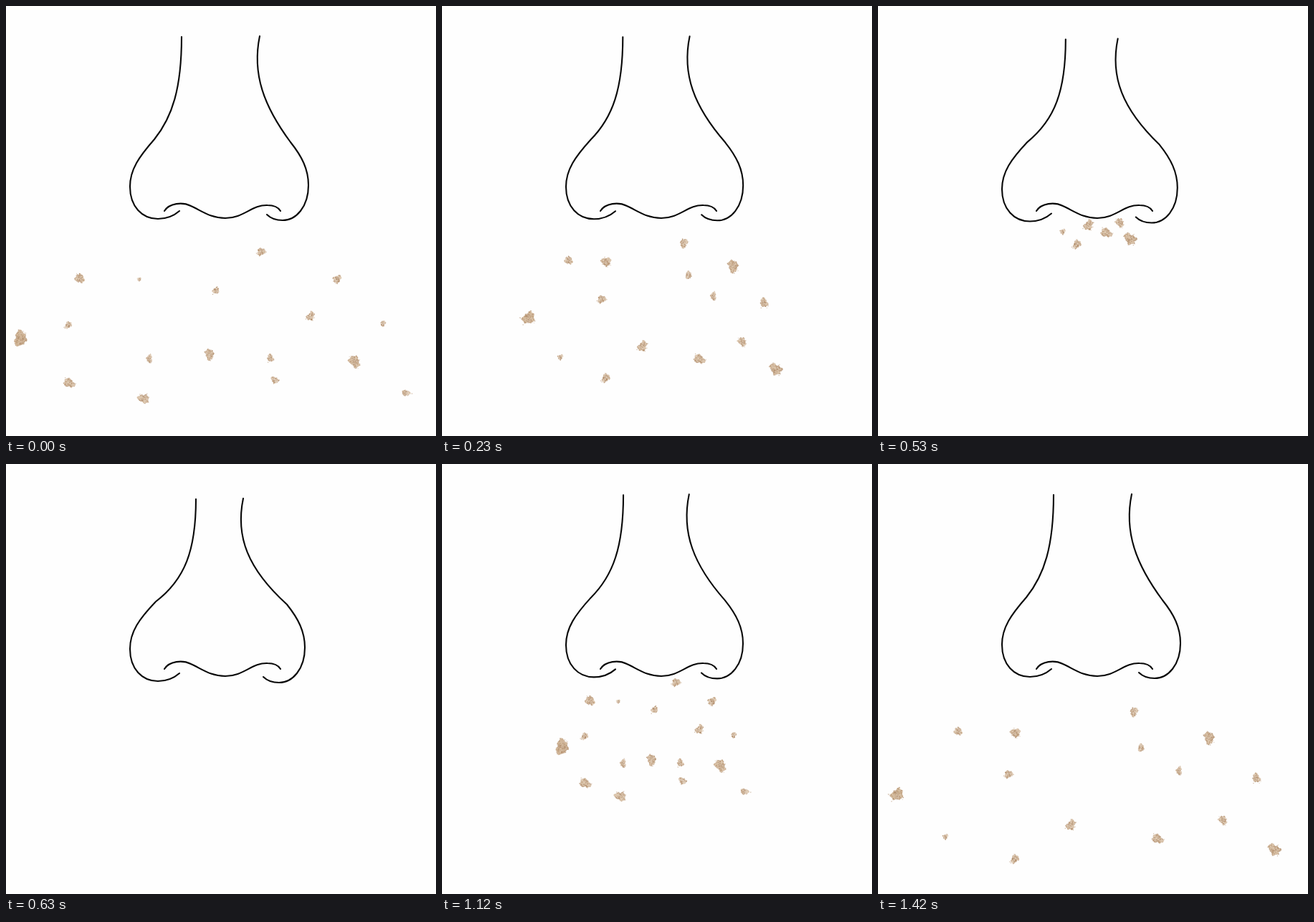
Write an HTML page with a canvas that moves like this. It is 600 by 600 pixels and loops after 1.55 s.

```html
<!DOCTYPE html>
<html lang="en">
<head>
<meta charset="utf-8">
<title>Breathing nose</title>
<style>
  html, body { margin: 0; height: 100%; overflow: hidden; background: #fefefe; }
  canvas { display: block; width: 600px; height: 600px; }
</style>
</head>
<body>
<canvas id="stage" width="600" height="600"></canvas>
<script>
const ctx = document.getElementById('stage').getContext('2d');
const LOOP = 1550;
// The drawing is held still between these moments.
const STEPS = [0, 130, 230, 330, 400, 430, 480, 530, 580, 630,
  920, 1020, 1070, 1120, 1170, 1220, 1320, 1420];
const MOUTH = { x: 300, y: 290 };

// Bezier chains of the relaxed nose.
const LEFT = [245,43, 245,115, 232,155, 207,186, 186,210, 173,228, 173,252,
  173,280, 190,297, 212,297, 224,297, 234,293, 242,286];
const RIGHT = [354,42, 343,95, 360,140, 397,190, 413,210, 422,228, 422,250,
  422,280, 405,299, 386,299, 377,299, 369,296, 364,291];
const BASE = [221,286, 228,275, 246,273, 258,279, 275,287, 286,296, 306,296,
  332,296, 343,277, 365,278, 374,278, 380,281, 383,286];

// Crumbs at rest: x, y, radius.
const INHALED = [[112,373,6], [192,375,7], [182,433,6], [27,461,9], [94,520,4],
  [191,551,6], [269,504,7], [357,346,6], [367,396,5], [420,428,5], [462,382,8],
  [528,438,6], [481,497,6], [553,538,8], [390,523,7]];
const EXHALED = [[103,380,7], [186,381,3], [356,343,6], [293,397,5], [462,381,6],
  [87,445,5], [425,433,6], [526,443,4], [20,464,10], [200,492,5], [284,486,7],
  [369,491,5], [486,496,8], [375,522,5], [88,526,7], [192,548,7], [558,540,5]];

const clamp = v => Math.max(0, Math.min(1, v));

function random(seed) {
  return () => (seed = (seed * 16807) % 2147483647) / 2147483647;
}

// The bridge narrows while the wings only sink; base and slope are sideways shifts.
function squeeze(points, pinch, base, slope) {
  return points.map((v, i) => {
    if (i % 2) return v + 6 * pinch ** 3;
    return v + pinch * (base + slope * clamp((190 - points[i + 1]) / 40));
  });
}

function stroke(p) {
  ctx.beginPath();
  ctx.moveTo(p[0], p[1]);
  for (let i = 2; i < p.length; i += 6) ctx.bezierCurveTo(...p.slice(i, i + 6));
  ctx.stroke();
}

function nose(pinch) {
  ctx.strokeStyle = '#080808';
  ctx.lineWidth = 2.1;
  ctx.lineCap = 'round';
  stroke(squeeze(LEFT, pinch, 0, 20));
  stroke(squeeze(RIGHT, pinch, -5, -18));
  stroke(BASE);
}

// A ragged, grainy blob; larger ones are denser.
function crumb(x, y, radius, seed) {
  const rnd = random(seed);
  const [a, b, c] = [rnd() * 6.28, rnd() * 6.28, rnd() * 6.28];
  const wide = radius * (.9 + .3 * rnd()), tall = radius * (.85 + .3 * rnd());
  const at = (angle, k) => {
    const r = k * (.88 + .16 * Math.sin(2 * angle + a) + .14 * Math.sin(3 * angle + b) + .1 * Math.sin(7 * angle + c));
    return [x + wide * r * Math.cos(angle), y + tall * r * Math.sin(angle)];
  };
  ctx.beginPath();
  for (let angle = 0; angle < 6.28; angle += .2) ctx.lineTo(...at(angle, .95));
  ctx.fillStyle = `rgba(203, 170, 132, ${.25 + radius * .055})`;
  ctx.fill();
  for (let i = 0; i < radius * radius * 2; i++) {
    const [gx, gy] = at(rnd() * 6.28, Math.sqrt(rnd()) * (rnd() < .1 ? 1.3 : 1));
    ctx.fillStyle = `hsla(29, 32%, ${45 + 35 * rnd()}%, .6)`;
    ctx.fillRect(gx - .6, gy - .6, 1.2, 1.2);
  }
}

// Crumbs drift to the middle and speed upwards until the nose swallows them.
function crumbs(list, breath) {
  const lift = 18 * breath ** 2.3;
  list.forEach(([x, y, radius], i) => {
    const top = y - lift * Math.sqrt(y - MOUTH.y);
    if (top > MOUTH.y) crumb(x + (MOUTH.x - x) * .9 * breath, top, radius, 7919 * (i + 3));
  });
}

function draw(now) {
  const time = now % LOOP;
  const t = STEPS.filter(s => s <= time).pop();
  const inhaling = t < 920;
  const out = clamp((1420 - t) / 500);
  const breath = inhaling ? t / 600 : .88 * out ** .8;
  const fresh = t < 130 || (t >= 1020 && t < 1420);

  ctx.fillStyle = '#fefefe';
  ctx.fillRect(0, 0, 600, 600);
  crumbs(fresh ? EXHALED : INHALED, breath);
  nose(inhaling ? t / 630 : .67 * out);
  requestAnimationFrame(draw);
}

draw(0);
</script>
</body>
</html>
```
